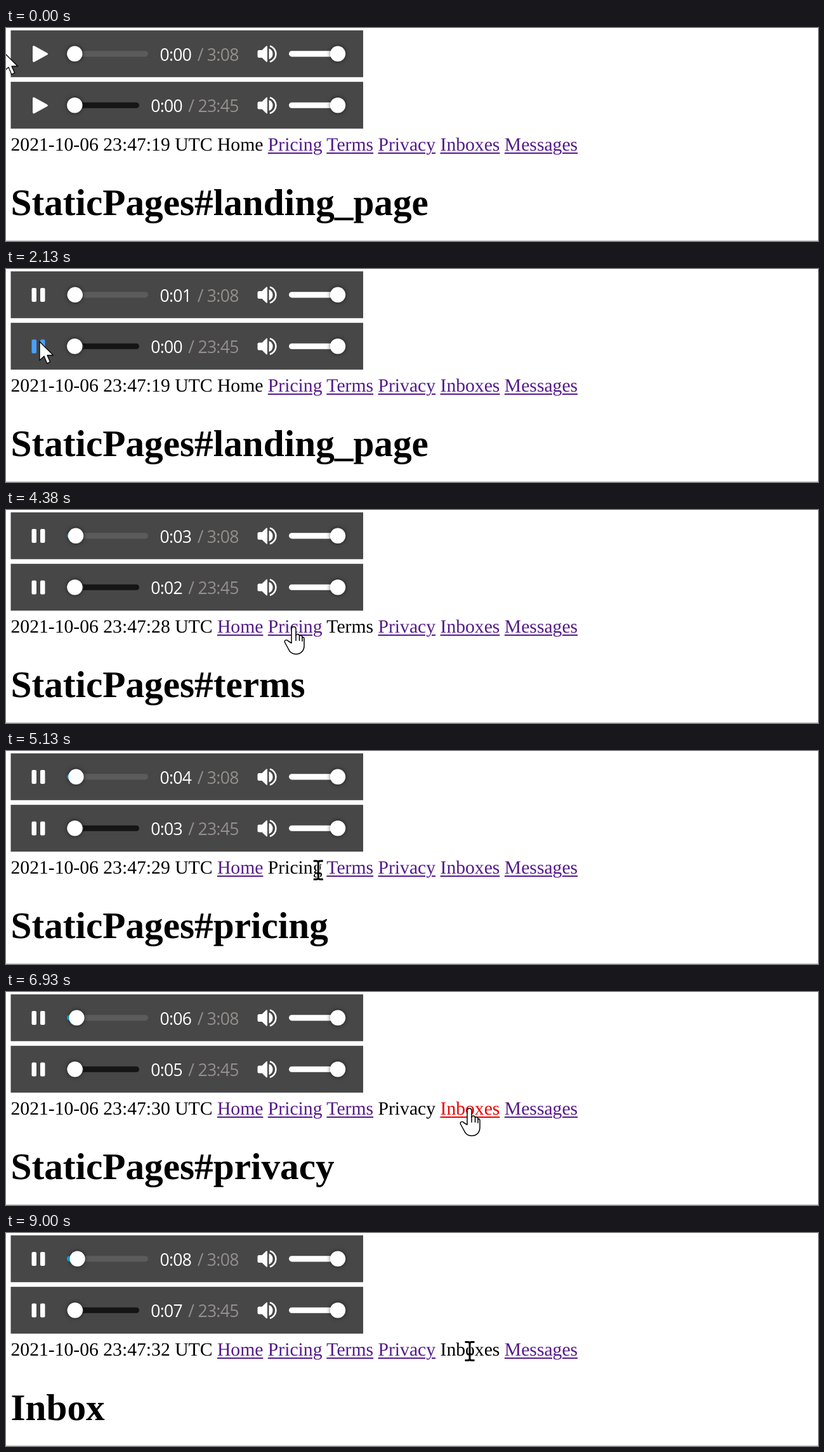
Write an HTML page that moves like this. It is 1280 px wide and 337 px high and loops after 9.17 s.

```html
<!DOCTYPE html>
<html lang="en">
<head>
<meta charset="utf-8">
<title>Persistent audio players</title>
<style>
  html, body { margin: 0; width: 100%; height: 100%; overflow: hidden; background: #fff; }
  svg { position: absolute; left: 0; top: 0; }
  nav, h1 {
    position: absolute; left: 7.5px; margin: 0; white-space: nowrap; color: #000;
    font-family: "Liberation Serif", "Times New Roman", serif;
    text-rendering: geometricPrecision;
  }
  nav { top: 168px; font-size: 29.66px; line-height: 34px; }
  nav .link {
    color: #551a8b; text-decoration: underline;
    text-decoration-thickness: 2px; text-underline-offset: 3px;
  }
  nav .link.active { color: #e00; }
  h1 { top: 242px; font-size: 59.25px; line-height: 68px; font-weight: bold; }
  .time { font: 26.5px "Open Sans", "Noto Sans", sans-serif; letter-spacing: -.7px; fill: #fff; }
  .total { fill: #968e8e; }
  .knob { fill: #fff; filter: drop-shadow(0 0 3px rgba(0, 0, 0, .6)); }
  .button { fill: #fff; }
  .button.hover { fill: #48a0f8; }
</style>
</head>
<body>
<svg id="stage" width="1280" height="337" viewBox="0 0 1280 337">
  <defs>
    <g id="speaker" fill="#fff">
      <path d="M399 35h4.500l6.500-6.300q2-1.500 2 1v22.600q0 2.500-2 1l-6.500-6.300h-4.500q-2.500 0-2.500-2.500v-7q0-2.500 2.500-2.500z"/>
      <path d="M414.500 32.500a9 9 0 0 1 0 17z"/>
      <path d="M416 28.500a13 13 0 0 1 0 25" fill="none" stroke="#fff" stroke-width="2.600"/>
    </g>
    <path id="play" d="M42 30.500q0-3.500 3-2l19.500 10.700q3 1.800 0 3.600l-19.500 10.700q-3 1.500-3-2z"/>
    <path id="pause" d="M42.500 30h3.500q2 0 2 2v18q0 2-2 2h-3.500q-2 0-2-2v-18q0-2 2-2zM56 30h3.500q2 0 2 2v18q0 2-2 2h-3.500q-2 0-2-2v-18q0-2 2-2z"/>
    <path id="beam" d="M-7.500-14.500H-3Q0-14.500 0-12Q0-14.500 3-14.500H7.500M-7.500 14.500H-3Q0 14.500 0 12Q0 14.500 3 14.500H7.500M0-13V13M-3 5H3"/>
  </defs>
  <path d="M0 336.500H1280" stroke="#c2c2c2"/>
</svg>
<nav id="nav"></nav>
<h1 id="title"></h1>
<svg width="1280" height="337" viewBox="0 0 1280 337">
  <g id="cursor" stroke-linejoin="round" stroke-linecap="round">
    <path data-kind="arrow" d="M0 0V29.500L7 23L11.700 34.300L16.700 32.200L12 21.500H21.500Z" fill="#fff" stroke="#000" stroke-width="1.300"/>
    <g data-kind="hand" fill="#fff" stroke="#000" stroke-width="1.500">
      <path d="M-4 23V0.500C-4-4 3-4 3 0.500V11C4 8 8.500 8.500 8.500 12C10 10 13 10.500 13 14C15 13 16 14.500 16 17V27C16 36 10 40.500 3 40.500C-4 40.500-7 37-9 32L-14.500 22C-16 18-11 17-9 20Z"/>
      <path d="M3 11V19M8.500 12V19M13 14V20" fill="none"/>
    </g>
    <g data-kind="text" fill="none" stroke-linecap="butt">
      <use href="#beam" stroke="#fff" stroke-width="5"/>
      <use href="#beam" stroke="#000" stroke-width="3"/>
    </g>
  </g>
</svg>
<script>
const LOOP = 9170;
const $ = id => document.getElementById(id);

// Each player: vertical offset, track, total time, start of playback, moments of the next second
const players = [
  { y: 0, end: 224, track: '#5b5b5b', timeX: 242.5, total: '3:08', length: 188, start: 1300,
    ticks: [1700, 2700, 3730, 4800, 5780, 6680, 7920, 8750] },
  { y: 81.45, end: 210, track: '#151515', timeX: 228.2, total: '23:45', length: 1425, start: 1960,
    ticks: [2880, 3900, 4900, 5900, 6850, 7750, 8920] }
];

const bar = (x, w, fill, cls = '') =>
  `<rect class="${cls}" x="${x}" y="36.200" width="${w}" height="9.200" rx="4.600" fill="${fill}"/>`;

for (const p of players) {
  $('stage').insertAdjacentHTML('beforeend', `
    <g transform="translate(0 ${p.y})">
      <rect x="7.500" y="3.700" width="555.500" height="74.100" fill="#474747"/>
      <use class="button" href="#play"/>
      ${bar(96, p.end - 96, p.track)}
      ${bar(96, 27, '#303030', 'buffer')}
      ${bar(96, 12, '#00b6f0', 'done')}
      <circle class="knob seek" cy="40.800" r="12.200"/>
      <text class="time now" x="${p.timeX}" y="51.600"></text>
      <text class="time total" x="366.600" y="51.600" text-anchor="end">/ ${p.total}</text>
      <use href="#speaker"/>
      ${bar(446, 80, '#fff')}
      <circle class="knob" cx="523" cy="40.800" r="12.200"/>
    </g>`);
  const g = $('stage').lastElementChild;
  for (const name of ['button', 'buffer', 'done', 'seek', 'now']) p[name] = g.querySelector('.' + name);
}

const names = ['Home', 'Pricing', 'Terms', 'Privacy', 'Inboxes', 'Messages'];
$('nav').innerHTML = '<span id="stamp">2021-10-06 23:47:19 UTC</span> ' +
  names.map(n => `<span class="link">${n}</span>`).join(' ');
const links = [...$('nav').querySelectorAll('.link')];

// Page visits: time shown, time pressed, current link, clock seconds, heading
const pages = [
  { at: 0, press: -1000, link: 0, sec: 19, title: 'StaticPages#landing_page' },
  { at: 3730, press: 3390, link: 2, sec: 28, title: 'StaticPages#terms' },
  { at: 4880, press: 4630, link: 1, sec: 29, title: 'StaticPages#pricing' },
  { at: 5850, press: 5610, link: 3, sec: 30, title: 'StaticPages#privacy' },
  { at: 7100, press: 6930, link: 4, sec: 32, title: 'Inbox' }
];

// Pointer stops: time, x, y
const path = [
  [0, -3, 39], [70, -3, 39], [165, -30, 41], [400, -24, 17], [970, 55, 44],
  [1380, 55, 44], [1790, 53, 115], [2340, 53, 115], [2970, 539, 187.5],
  [3820, 539, 187.5], [4380, 454, 187.5], [4960, 454, 187.5], [5530, 631, 192],
  [6100, 631, 192], [6490, 725, 189], [6590, 725, 189], [6760, 731, 187], [LOOP, 731, 187]
];

function pointer(t) {
  const i = Math.max(1, path.findIndex(k => k[0] > t));
  const [a, b] = [path[i - 1], path[i]];
  let u = (t - a[0]) / (b[0] - a[0]);
  u = u * u * (3 - 2 * u);
  return [a[1] + (b[1] - a[1]) * u, a[2] + (b[2] - a[2]) * u];
}

function setText(el, s) { if (el.textContent !== s) el.textContent = s; }

function drawPlayer(p, t, x, y) {
  const playing = t >= p.start;
  const sec = p.ticks.filter(k => t >= k).length;
  const pos = Math.max(0, t - p.start) / 1000 / p.length;
  const knobX = 108.3 + pos * 104;
  p.button.setAttribute('href', playing ? '#pause' : '#play');
  p.button.classList.toggle('hover', x > 31 && x < 71 && y - p.y > 20 && y - p.y < 61);
  p.buffer.style.display = playing && p.y ? '' : 'none';
  p.done.style.display = playing ? '' : 'none';
  p.done.setAttribute('width', knobX - 96);
  p.seek.setAttribute('cx', knobX);
  setText(p.now, '0:0' + sec);
}

function drawPage(t) {
  const page = pages.filter(p => t >= p.at).pop();
  const pressed = pages.find(p => t >= p.press && t < p.press + 165);
  links.forEach((el, i) => {
    el.classList.toggle('link', i !== page.link);
    el.classList.toggle('active', !!pressed && pressed.link === i);
  });
  setText($('stamp'), `2021-10-06 23:47:${page.sec} UTC`);
  setText($('title'), page.title);
  return page;
}

function drawCursor(x, y, page) {
  let kind = 'arrow';
  if (y > 168 && y < 202 && x > 7 && x < 901) {
    const over = links.findIndex(el => {
      const r = el.getBoundingClientRect();
      return x >= r.left && x <= r.right;
    });
    kind = over >= 0 && over !== page.link ? 'hand' : 'text';
  }
  $('cursor').setAttribute('transform', `translate(${x.toFixed(2)} ${y.toFixed(2)})`);
  for (const el of $('cursor').children) el.style.display = el.dataset.kind === kind ? '' : 'none';
}

function draw() {
  const t = performance.now() % LOOP;
  const [x, y] = pointer(t);
  players.forEach(p => drawPlayer(p, t, x, y));
  drawCursor(x, y, drawPage(t));
  requestAnimationFrame(draw);
}
draw();
</script>
</body>
</html>
```
